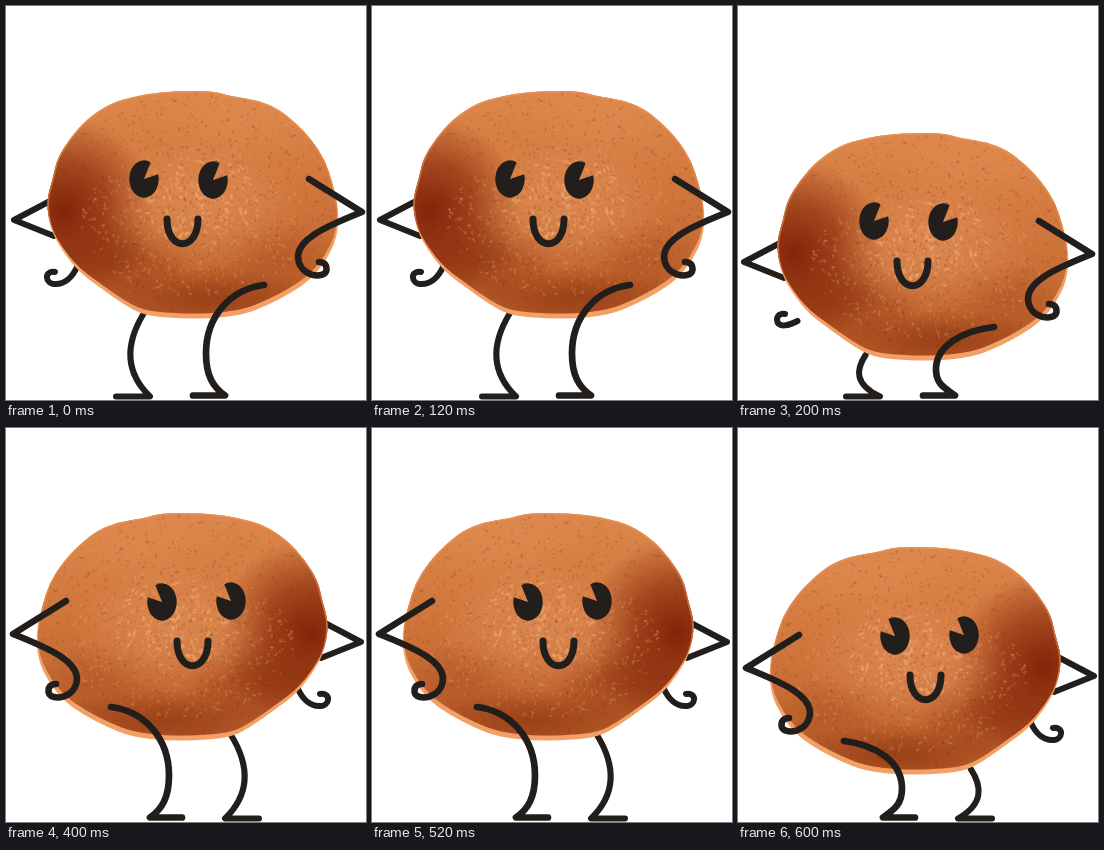
Recreate the animation shown at these times as an HTML page with a canvas. Size 360x394 px, loop 0.8 s.

```html
<!DOCTYPE html>
<html lang="en">
<head>
<meta charset="utf-8">
<title>Dancing pancake</title>
<style>
  html, body { margin: 0; width: 100%; height: 100%; overflow: hidden; background: #fff; }
  canvas { display: block; }
</style>
</head>
<body>
<canvas id="stage" width="360" height="394"></canvas>
<script>
const W = 360, H = 394, INK = '#211e1c', STEP = 200;
const ctx = document.getElementById('stage').getContext('2d');

// Each pose: body offset and facing
const poses = [
  { dx: 0, dy: 0 },
  { dx: -2, dy: 42, shortHand: true },
  { dx: 0, dy: 0, flip: true },
  { dx: -1, dy: 34, flip: true }
];

const rim = [
  [155, 86], [180, 85], [207, 85], [224, 90], [250, 94], [271, 102], [290, 117],
  [306, 134], [319, 154], [327, 178], [333, 205], [331, 232], [320, 255], [304, 274],
  [285, 287], [262, 299], [237, 309], [200, 313], [165, 312], [137, 309], [117, 298],
  [96, 283], [73, 266], [57, 246], [45, 225], [40, 196], [47, 172], [51, 153],
  [64, 132], [82, 112], [105, 97], [130, 90]
];

function smooth(points) {
  const p = new Path2D(), n = points.length;
  const mid = i => {
    const a = points[i % n], b = points[(i + 1) % n];
    return [(a[0] + b[0]) / 2, (a[1] + b[1]) / 2];
  };
  p.moveTo(...mid(n - 1));
  for (let i = 0; i < n; i++) p.quadraticCurveTo(...points[i], ...mid(i));
  p.closePath();
  return p;
}

let seed = 7;
function rand() {
  seed = (seed * 16807) % 2147483647;
  return seed / 2147483647;
}

function glow(c, x, y, rx, ry, rgb, alpha) {
  c.save();
  c.translate(x, y);
  c.scale(rx, ry);
  const g = c.createRadialGradient(0, 0, 0, 0, 0, 1);
  g.addColorStop(0, `rgba(${rgb},${alpha})`);
  g.addColorStop(0.5, `rgba(${rgb},${alpha * 0.6})`);
  g.addColorStop(1, `rgba(${rgb},0)`);
  c.fillStyle = g;
  c.fillRect(-1, -1, 2, 2);
  c.restore();
}

// Scatter small blots, densest around (x, y)
function speckle(c, count, x, y, rx, ry, size, color) {
  c.fillStyle = color;
  for (let i = 0; i < count; i++) {
    const a = rand() * Math.PI * 2, d = Math.pow(rand(), 0.6);
    const r = size * (0.4 + rand() * 0.6);
    c.beginPath();
    c.ellipse(x + Math.cos(a) * d * rx, y + Math.sin(a) * d * ry,
      r * 1.5, r * 0.7, rand() * 3, 0, Math.PI * 2);
    c.fill();
  }
}

function bakePancake() {
  const layer = document.createElement('canvas');
  layer.width = W;
  layer.height = H;
  const c = layer.getContext('2d'), shape = smooth(rim);
  c.fillStyle = '#f3a066';
  c.fill(shape);
  c.clip(shape);
  c.translate(-1, -5);
  c.clip(shape);
  c.translate(1, 5);

  const base = c.createLinearGradient(0, 85, 0, 312);
  base.addColorStop(0, '#dc874b');
  base.addColorStop(0.45, '#d0763c');
  base.addColorStop(1, '#b85c28');
  c.fillStyle = base;
  c.fillRect(0, 0, W, H);

  glow(c, 58, 205, 92, 95, '126,32,6', 0.95);
  glow(c, 105, 256, 80, 42, '132,42,10', 0.55);
  glow(c, 205, 292, 115, 30, '136,48,14', 0.65);
  glow(c, 275, 255, 60, 40, '160,70,26', 0.35);
  glow(c, 195, 200, 100, 65, '228,148,94', 0.6);
  glow(c, 235, 115, 95, 45, '224,140,82', 0.5);
  speckle(c, 900, 187, 200, 146, 114, 1.4, 'rgba(124,44,12,.2)');
  speckle(c, 520, 190, 215, 115, 75, 1.6, 'rgba(238,164,110,.28)');
  speckle(c, 130, 195, 195, 65, 45, 2.3, 'rgba(242,180,128,.4)');
  c.strokeStyle = 'rgba(238,152,90,.55)';
  c.lineWidth = 3;
  c.stroke(shape);
  return layer;
}
const pancake = bakePancake();

function line(d, width) {
  ctx.lineWidth = width;
  ctx.stroke(new Path2D(d));
}

function eye(x, y) {
  ctx.beginPath();
  ctx.moveTo(x, y);
  ctx.ellipse(x, y, 14.7, 18.7, 0, -0.25, Math.PI * 1.65);
  ctx.fill();
}

function draw({ dx, dy, flip, shortHand }) {
  ctx.setTransform(1, 0, 0, 1, 0, 0);
  ctx.clearRect(0, 0, W, H);
  if (flip) ctx.setTransform(-1, 0, 0, 1, 363, 0);
  ctx.translate(dx, 0);
  ctx.strokeStyle = ctx.fillStyle = INK;
  ctx.lineCap = ctx.lineJoin = 'round';

  // Feet stay on the ground while the hips move
  const backHip = 307 + dy, backLen = 390.5 - backHip;
  line(`M${138 - dy * 0.2},${backHip} C120,${backHip + backLen * 0.35}
    118,${backHip + backLen * 0.7} 144,390.5 H110`, 6);

  ctx.save();
  ctx.translate(0, dy);
  line('M46,194 L8,214 L48,230', 6);
  line(shortHand
    ? 'M61.5,273 C54,277 42,281 41,272 C41,267 45,265 49,266'
    : 'M71,261 C66,272 58,278 50,278 C38,278 38,264 49,266', 6);
  ctx.drawImage(pancake, 0, 0);
  eye(138, 173);
  eye(207, 174);
  line('M161,213 C161,246 192,246 192,213', 7);
  line('M303,173 L356,206 C318,221 293,233 292,250 C292,271 319,274 320.5,264 C321,257 316,256 313,256', 6.5);
  ctx.restore();

  const hip = 279 + dy, len = 389.5 - hip, knee = hip + len * 0.62;
  line(`M258,${hip} C225,${hip + 4} 200,${hip + len * 0.28} 200,${knee}
    C200,${knee + len * 0.2} 207,381 219,389.5 H187`, 6.7);
}

let shown = -1;
function tick(now) {
  const i = Math.floor(now / STEP) % poses.length;
  if (i !== shown) draw(poses[shown = i]);
  requestAnimationFrame(t => tick(Math.max(0, t - start)));
}
const start = performance.now();
tick(0);
</script>
</body>
</html>
```
